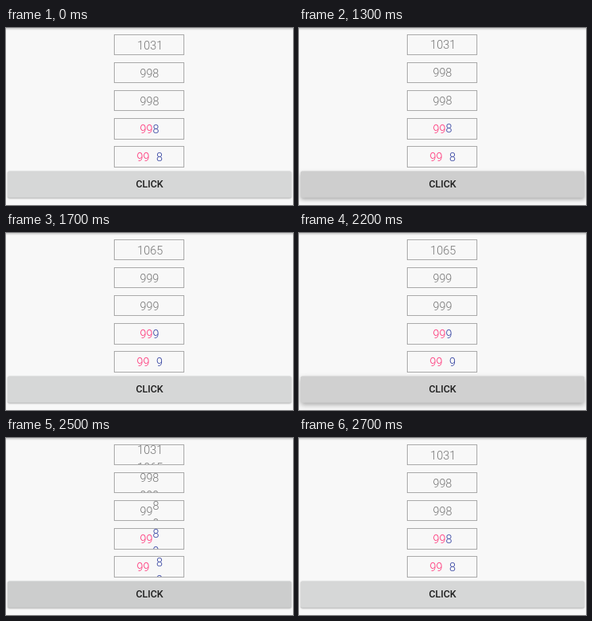
Animation, 359 px wide and 222 px high, one loop 3700 ms. Source, as an HTML page with a canvas:

```html
<!DOCTYPE html>
<html lang="en">
<head>
<meta charset="utf-8">
<style>
html, body { margin: 0; width: 100%; height: 100%; overflow: hidden; background: #f8f8f8; }
canvas { display: block; }
</style>
</head>
<body>
<canvas id="stage" width="359" height="222"></canvas>
<script>
const ctx = document.getElementById('stage').getContext('2d');
const LOOP = 3700, STEP = 100, UP_AT = 1200, DOWN_AT = 2200;
const TRAVEL = 22, PITCH = 35.2, DIGIT = 8.1;
const GRAY = '#757575', PINK = '#ff2f75', BLUE = '#303f9f';

// fixed text stays; low and high swap places by scrolling
const rows = [
  { x: 164.2, fixed: '', low: '1031', high: '1065', color: GRAY },
  { x: 167.4, fixed: '', low: '998', high: '999', color: GRAY },
  { x: 167.4, fixed: '99', low: '8', high: '9', color: GRAY },
  { x: 167.4, fixed: '99', low: '8', high: '9', color: BLUE, fixedColor: PINK },
  { x: 163.6, fixed: '99', gap: 1, low: '8', high: '9', color: BLUE, fixedColor: PINK }
];

// button look for each step after a click, the last one being at rest
const pressLooks = [
  { fill: '#d0d0d0', lift: 3 },
  { fill: '#cecece', lift: 2.5 },
  { fill: '#cccccc', lift: 1.5 },
  { fill: '#cccdcd', lift: 1 },
  { fill: '#d1d2d2', lift: 1 },
  { fill: '#d6d7d7', lift: 1 }
];

function ease(elapsed) {
  const p = Math.min(1, Math.max(0, (elapsed - 50) / 400));
  return (1 - Math.cos(Math.PI * p)) / 2;
}

function text(string, x, y, color) {
  ctx.fillStyle = color;
  ctx.fillText(string, x, y);
}

function drawRow(row, index, shift) {
  const top = 8 + index * PITCH, baseline = top + 18.6;
  const boxTop = Math.floor(top), boxBottom = Math.round(top + 26);
  const x = row.x + (row.fixed.length + (row.gap || 0)) * DIGIT;
  ctx.save();
  ctx.beginPath();
  ctx.rect(135, boxTop, 88, boxBottom - boxTop);
  ctx.clip();
  text(row.fixed, row.x, baseline, row.fixedColor || row.color);
  text(row.low, x, baseline - shift * TRAVEL, row.color);
  text(row.high, x, baseline + (1 - shift) * TRAVEL, row.color);
  ctx.restore();
  ctx.strokeStyle = '#aaa';
  ctx.strokeRect(135.5, boxTop + 0.5, 87, boxBottom - boxTop - 1);
}

function drawButton({ fill, lift }) {
  ctx.save();
  ctx.shadowColor = 'rgba(0,0,0,.3)';
  ctx.shadowBlur = 2 * lift;
  ctx.shadowOffsetY = lift;
  ctx.fillStyle = fill;
  ctx.beginPath();
  ctx.roundRect(2, 179.6, 355, 33.2, 2);
  ctx.fill();
  ctx.restore();
  ctx.font = '500 12.4px Roboto, sans-serif';
  ctx.textAlign = 'center';
  text('CLICK', 179.5, 200.4, '#1e1e1e');
}

function draw(now) {
  const time = Math.floor(now % LOOP / STEP) * STEP;
  const shift = ease(time - UP_AT) - ease(time - DOWN_AT);
  const sinceClick = time - (time < DOWN_AT ? UP_AT : DOWN_AT);
  const step = sinceClick < 0 ? 5 : Math.min(5, sinceClick / STEP);

  ctx.fillStyle = '#f8f8f8';
  ctx.fillRect(0, 0, 359, 222);
  const shade = ctx.createLinearGradient(0, 0, 0, 3);
  shade.addColorStop(0, '#c8c8c8');
  shade.addColorStop(1, '#f8f8f8');
  ctx.fillStyle = shade;
  ctx.fillRect(0, 0, 359, 3);

  ctx.font = '300 14.4px Roboto, sans-serif';
  ctx.textAlign = 'left';
  rows.forEach((row, index) => drawRow(row, index, shift));
  drawButton(pressLooks[step]);
}

const start = performance.now();
function tick() {
  draw(performance.now() - start);
  requestAnimationFrame(tick);
}
tick();
</script>
</body>
</html>
```
